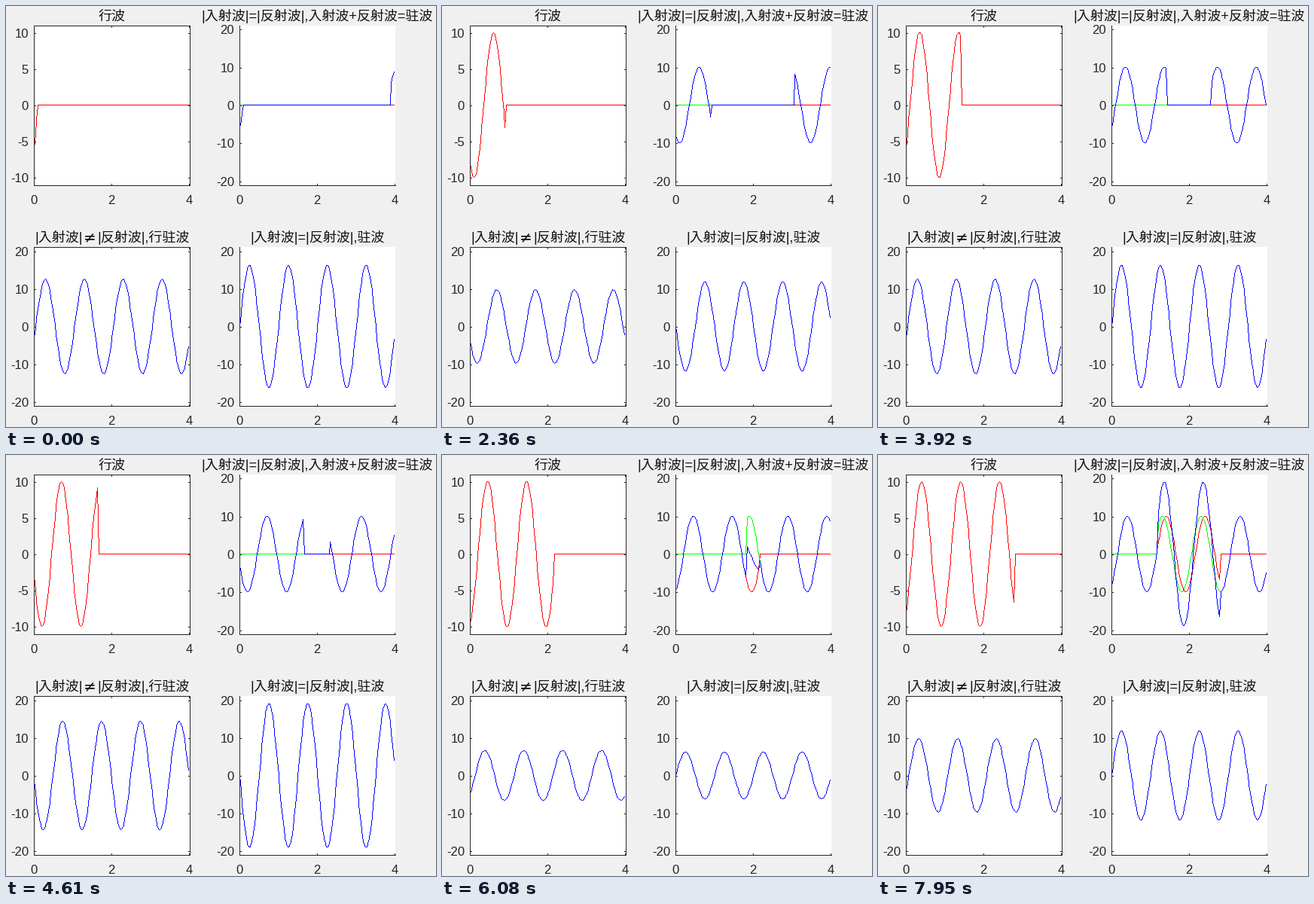
Recreate the animation shown at these times as a matplotlib script. Size 571 by 559 pixels, loop 8 s.

```python
import numpy as np
import matplotlib.pyplot as plt
from matplotlib.animation import FuncAnimation
from matplotlib.collections import LineCollection
from matplotlib.patches import Rectangle

W, H, DPI = 571, 559, 128
PX = 72 / DPI
LOOP, INTERVAL = 8000, 25
SPAN = 206.5          # panel width in pixels, covers x = 0..4
INK = "#262626"

plt.rcParams["font.family"] = ["Liberation Sans", "Noto Sans CJK JP"]
fig = plt.figure(figsize=(W / DPI, H / DPI), dpi=DPI, facecolor="#f0f0f0")
ax = fig.add_axes([0, 0, 1, 1])
ax.set_xlim(0, W)
ax.set_ylim(H, 0)
ax.axis("off")


def label(x, y, s, size=16.67, ha="center", color=INK, **kw):
    ax.text(x, y, s, fontsize=size * PX, ha=ha, va="baseline", color=color, **kw)


def title(x, y, s, ha="center", size=18, **kw):
    label(x, y, s, size, ha, "#111111", **kw)


def trace(x, y):
    """Pixels of a one pixel wide polyline without smoothing."""
    x, y = np.round(x), np.round(y)
    steps = np.maximum(abs(np.diff(x)), abs(np.diff(y)))
    knots = np.append(0, np.cumsum(steps))
    s = np.arange(knots[-1] + 1)
    return np.round(np.interp(s, knots, x)), np.round(np.interp(s, knots, y))


class Panel:
    """A plot area drawn in pixel coordinates."""

    def __init__(self, left, top, bottom, lim, ticks, boxed):
        self.left, self.lim = left, lim
        self.mid, self.half = (top + bottom + 1) // 2, (bottom - top) / 2
        right = left + 207
        ax.add_patch(Rectangle((left, top), 207, bottom - top, fc="white",
                               lw=0, antialiased=False, zorder=0))
        segs = [[(left, top), (left, bottom)], [(left, bottom), (right, bottom)]]
        if boxed:
            segs += [[(right, top), (right, bottom)], [(left, top), (right, top)]]
        for v in (0, 2, 4):
            x = int(self.x(v))
            segs.append([(x, bottom), (x, bottom - 2)])
            if boxed:
                segs.append([(x, top), (x, top + 2)])
            label(x, bottom + 25, str(v))
        for v in ticks:
            y = round(self.y(v))
            segs.append([(left, y), (left + 2, y)])
            if boxed:
                segs.append([(right, y), (right - 2, y)])
            label(left - 7, y + 6, str(v), ha="right")
        ax.add_collection(LineCollection(segs, colors=INK, linewidths=PX,
                                         antialiased=False, zorder=5))

    def x(self, v):
        return self.left + v * SPAN / 4

    def y(self, v):
        return self.mid - v / self.lim * self.half

    def curve(self, color):
        return ax.plot([], [], ls="none", marker=",", color=color,
                       antialiased=False, zorder=3)[0]

    def show(self, line, x, v):
        line.set_data(*trace(self.x(x), self.y(v)))


tens = range(-20, 21, 10)
travel = Panel(37, 26, 238, 11, range(-10, 11, 5), True)
meet = Panel(310, 26, 238, 21, tens, False)
partial = Panel(37, 320, 531, 21, tens, True)
standing = Panel(310, 320, 531, 21, tens, False)

title(141, 19, "行波")
title(413.5, 19, "|入射波|=|反射波|,入射波+反射波=驻波")
title(102, 313, "|入射波|", ha="right")
title(111, 313, "≠", size=20, family="DejaVu Sans")
title(121, 313, "|反射波|,行驻波", ha="left")
title(413.5, 313, "|入射波|=|反射波|,驻波")

travel_line = travel.curve("red")
in_line, back_line, sum_line = [meet.curve(c) for c in ("red", "lime", "blue")]
partial_line = partial.curve("blue")
standing_line = standing.curve("blue")

N = 120                       # samples, 30 per wavelength
j = np.arange(N)
x = j / 30
kx = 2 * np.pi * x


def wave_step(ms):
    """Ticks of 77 ms; two of every nine are pauses."""
    tick = (ms + 55) // 77
    return tick - 2 * tick // 9


def update(i):
    n = wave_step(i * INTERVAL)
    a = np.radians(126 + 18 * n)
    b = np.radians(30 * n - 18)
    front = n + 2

    incident = np.where(j <= front, 10 * np.cos(a - kx), 0)
    reflected = np.where(j >= N - 1 - front, 10 * np.cos(b + kx), 0)

    travel.show(travel_line, np.append(x, 4), np.append(incident, 0))
    meet.show(in_line, x, incident)
    meet.show(back_line, x, reflected)
    meet.show(sum_line, x, incident + reflected)
    partial.show(partial_line, x, 10 * np.cos(a - kx) - 5 * np.cos(a + kx))
    standing.show(standing_line, x, 20 * np.sin(a) * np.sin(kx))
    return (travel_line, in_line, back_line, sum_line,
            partial_line, standing_line)


anim = FuncAnimation(fig, update, frames=LOOP // INTERVAL, interval=INTERVAL,
                     repeat=True, repeat_delay=0, blit=False)
plt.show()
```
